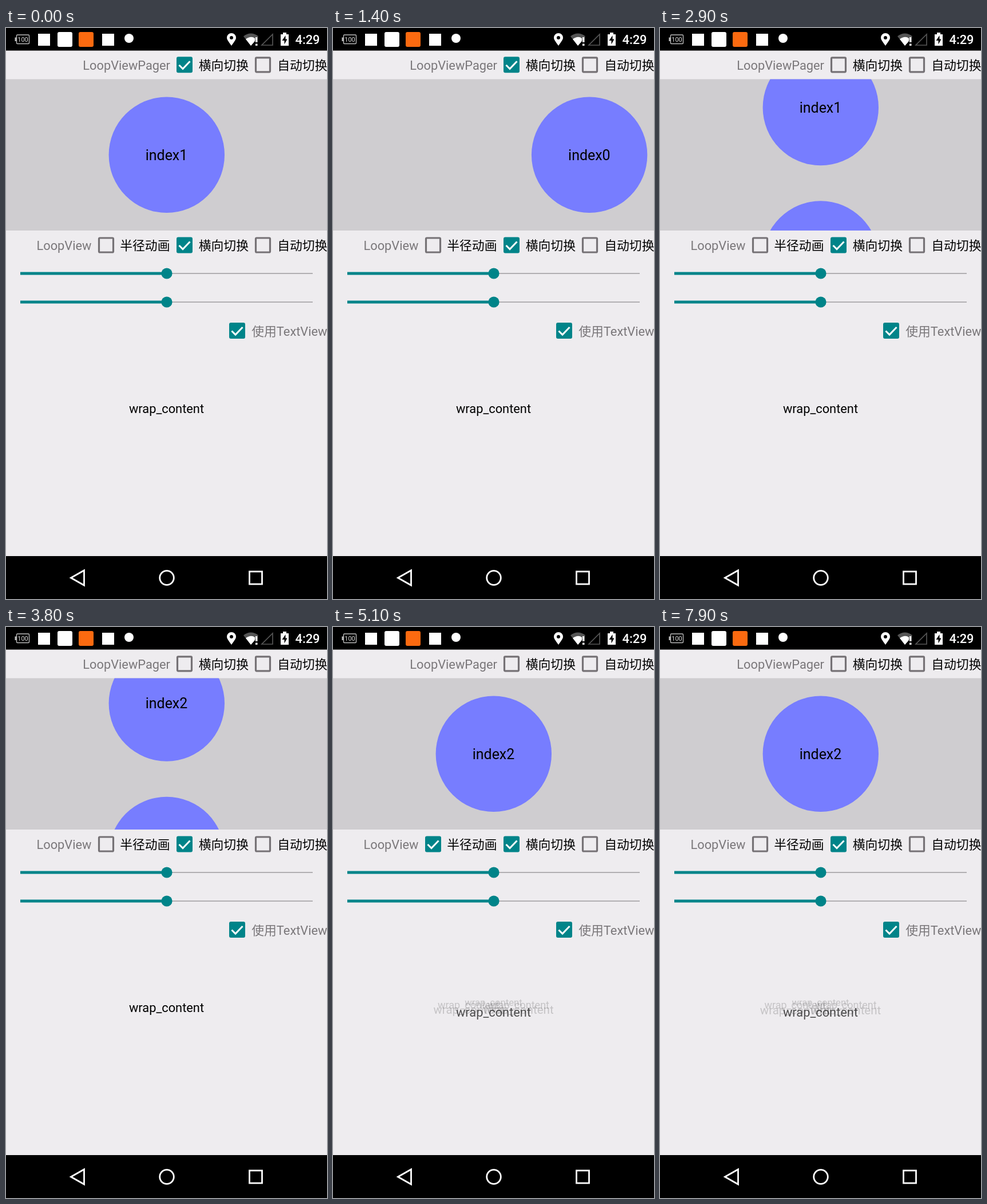
An HTML page for the animation above (8000 ms loop, 561 by 998 pixels).

```html
<!DOCTYPE html>
<html lang="zh">
<head>
<meta charset="utf-8">
<style>
html, body { margin: 0; width: 100%; height: 100%; overflow: hidden; background: #eeecef; }
svg { display: block; width: 561px; height: 998px; }
text { font: 21.82px Roboto, "Noto Sans CJK SC", "Noto Sans CJK", sans-serif; }
.end { text-anchor: end; }
.mid { text-anchor: middle; }
.muted { fill: #7a777a; }
.line { fill: none; stroke: #fff; stroke-width: 2.8; }
</style>
</head>
<body>
<svg viewBox="0 0 561 998">
  <defs>
    <clipPath id="pagerClip"><rect y="89.5" width="561" height="264.5"/></clipPath>
    <g id="off"><rect x="-12.5" y="-12.5" width="25" height="25" rx="1.5" fill="none" stroke="#757175" stroke-width="3.2"/></g>
    <g id="on">
      <rect x="-14" y="-14" width="28" height="28" rx="3" fill="#008489"/>
      <path d="M-9.5 .5L-3 7L9.5 -6" fill="none" stroke="#fff" stroke-width="3"/>
    </g>
    <g id="slider">
      <path d="M281 0H536" stroke="#777477" stroke-width="1.2"/>
      <path d="M25 0H281" stroke="#008489" stroke-width="5"/>
      <circle cx="281" r="9.6" fill="#008489"/>
    </g>
  </defs>
  <rect width="561" height="998" fill="#eeecef"/>

  <!-- status bar -->
  <rect width="561" height="39.5"/>
  <g fill="#fff">
    <rect x="18.5" y="12" width="22" height="15.5" rx="1.5" fill="none" stroke="#bbb" stroke-width="1.4"/>
    <rect x="15.5" y="16.5" width="2.5" height="6.5" fill="#bbb"/>
    <text class="mid" x="29.5" y="24" style="font-size:11px" fill="#ddd">100</text>
    <rect x="56" y="10" width="21" height="21"/>
    <rect x="90" y="7" width="26" height="26" rx="3"/>
    <rect x="127" y="7" width="26" height="26" rx="3" fill="#fc6a10"/>
    <rect x="168" y="10" width="21" height="21"/>
    <circle cx="215" cy="18" r="8"/>
    <path fill-rule="evenodd" d="M394 31C389 24 386 20 386 17A8 8 0 0 1 402 17C402 20 399 24 394 31ZM391 17a3 3 0 1 0 6 0a3 3 0 1 0 -6 0Z"/>
    <path d="M428 31L415 14.5Q428 4.500 441 14.500Z" fill="#555"/>
    <path d="M428 31L419 19.500Q428 13 435 18V23Z"/>
    <path d="M436 16h3.500v9h-3.500zM436 27.500h3.500v3.500h-3.500z"/>
    <path d="M447 30H466V11Z" fill="none" stroke="#555" stroke-width="1.700"/>
    <path d="M480 11h4v-3h6v3h4v20h-14z"/>
    <path d="M488.500 13L482.500 22H486.500V28.500L491.500 19.500H488.500Z" fill="#000"/>
    <text class="end" x="548.500" y="28" font-weight="500" style="font-weight:500">4:29</text>
  </g>

  <!-- pager -->
  <text class="end muted" x="287" y="72.500">LoopViewPager</text>
  <use id="pagerBox" x="312" y="64.300"/>
  <text class="end" x="424" y="72.500">横向切换</text>
  <use href="#off" x="449" y="64.300"/>
  <text class="end" x="561.500" y="72.500">自动切换</text>
  <rect y="89.500" width="561" height="264.500" fill="#cfcdd0"/>
  <g id="pages" clip-path="url(#pagerClip)"></g>

  <!-- ring controls -->
  <text class="end muted" x="149.500" y="387.500">LoopView</text>
  <use id="ringBox" x="175" y="379.500"/>
  <text class="end" x="286.500" y="387.500">半径动画</text>
  <use href="#on" x="312" y="379.500"/>
  <text class="end" x="424" y="387.500">横向切换</text>
  <use href="#off" x="449" y="379.500"/>
  <text class="end" x="561.500" y="387.500">自动切换</text>
  <use href="#slider" y="429"/>
  <use href="#slider" y="479"/>
  <use href="#on" x="404" y="529"/>
  <text class="end muted" x="561.500" y="537.500">使用TextView</text>
  <g id="ring"></g>

  <!-- navigation bar -->
  <rect y="923" width="561" height="75"/>
  <g class="line">
    <path d="M113.500 961L136.500 948V974Z"/>
    <circle cx="281" cy="961" r="12.300"/>
    <rect x="425.500" y="950" width="22" height="22"/>
  </g>
</svg>
<script>
const LOOP = 8000, W = 561, H = 264.5;
const MAX_R = 104, GROW = 4320, SHRINK = 7064, SPAN = 2790, DEPTH = 381;
const $ = id => document.getElementById(id);
const clamp = u => Math.min(1, Math.max(0, u));
const smooth = u => u * u * (3 - 2 * u);

// Each swipe: start, duration, page left, page entered, vertical?
const swipes = [
  [300, 500, 1, 0, false],
  [1220, 500, 0, 2, false],
  [2650, 400, 2, 1, true],
  [3100, 400, 1, 0, true],
  [3556, 400, 0, 2, true]
];

const pages = [0, 1, 2].map(i => {
  const g = document.createElementNS('http://www.w3.org/2000/svg', 'g');
  g.innerHTML = `<circle cx="280.8" cy="221.8" r="101.2" fill="#777dff"/>
    <text class="mid" x="280.5" y="230.7" style="font-size:24.93px">index${i}</text>`;
  return $('pages').appendChild(g);
});

// Six labels, ordered back to front
const labels = [180, 120, -120, 60, -60, 0].map(deg => {
  const node = document.createElementNS('http://www.w3.org/2000/svg', 'text');
  node.textContent = 'wrap_content';
  node.setAttribute('class', 'mid');
  node.setAttribute('y', 7.5);
  $('ring').append(node);
  return { node, angle: deg * Math.PI / 180 };
});

function place(page, vertical, offset) {
  page.style.display = '';
  page.setAttribute('transform', vertical ? `translate(0 ${offset * H})` : `translate(${offset * W} 0)`);
}

function drawPages(t) {
  const [start, span, from, to, vertical] = swipes.filter(s => s[0] <= t).pop() || swipes[0];
  const p = smooth(clamp((t - start) / span));
  pages.forEach(page => page.style.display = 'none');
  place(pages[from], vertical, p);
  place(pages[to], vertical, p - 1);
}

function radius(t) {
  if (t < SHRINK) return MAX_R * (1 - (1 - clamp((t - GROW) / SPAN)) ** 2);
  return MAX_R * (1 - clamp((t - SHRINK) / SPAN)) ** 2;
}

function drawRing(r) {
  labels.forEach(({ node, angle }) => {
    const z = r * Math.cos(angle), front = angle === 0;
    const x = 280.5 + r * Math.sin(angle), y = 665 + z * 0.175;
    node.setAttribute('transform', `translate(${x} ${y}) scale(${(DEPTH + z) / (DEPTH + r)})`);
    node.style.opacity = r === 0 ? +front : front ? 0.66 : 0.17;
  });
}

function draw(now) {
  const t = now % LOOP;
  drawPages(t);
  drawRing(radius(t));
  $('pagerBox').setAttribute('href', t < 2200 ? '#on' : '#off');
  $('ringBox').setAttribute('href', t >= GROW && t < SHRINK ? '#on' : '#off');
}

const begin = performance.now();
function tick() {
  draw(performance.now() - begin);
  requestAnimationFrame(tick);
}
tick();
</script>
</body>
</html>
```
